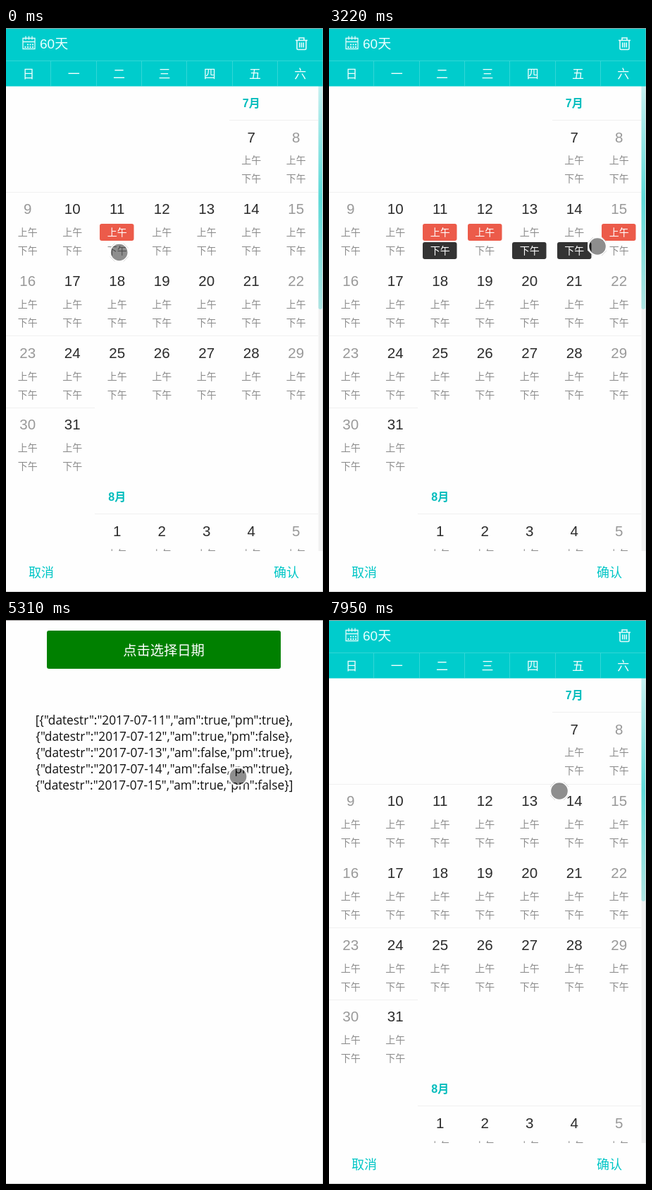
These frames come from a looping animation (450x798 px, 8 s). An HTML page with a canvas:

```html
<!DOCTYPE html>
<html lang="zh-CN">
<head>
<meta charset="utf-8">
<style>
html, body { margin: 0; width: 100%; height: 100%; overflow: hidden; background: #fefefe }
canvas { display: block }
</style>
</head>
<body>
<canvas id="stage" width="450" height="798"></canvas>
<script>
const c = document.getElementById('stage').getContext('2d');
const CJK = '"Noto Sans CJK SC", "Noto Sans CJK", sans-serif';
const ARIAL = '"Liberation Sans", ' + CJK;
const TEAL = '#00cccc', PAPER = '#fefefe', LINE = '#f0f0f0', RULE = '#33d6d6';

const LOOP = 8000, STEP = 130, BEAT = 560, TRAVEL = 300;
const CLOSE = 4367, OPEN = 5720, SLIDE = 353, CLEAR = 7800;

// One half day is picked on every beat
const picks = ['11am', '11pm', '12am', '13pm', '14pm', '15am'];
const columnX = col => 30.7 + col * 63.5;
const rowY = row => 154 + row * 101.7;
const halfY = (y, pm) => y + 33.3 + pm * 26;

// Pointer path as time, x, y: from pick to pick, then over the page and back
const path = picks.slice(1).flatMap((p, i) => {
  const x = columnX(parseInt(p) - 9) + 3, y = halfY(rowY(1), p.endsWith('pm')) + 2.5;
  return [[i && BEAT * i + TRAVEL, x, y], [BEAT * (i + 1), x, y]];
}).concat([
  [3250, 381, 309], [3510, 306, 530], [3770, 397, 762], [4310, 397, 762],
  [4550, 376, 723], [4940, 428, 520], [5550, 274, 53], [6110, 274, 53],
  [6500, 414, 55], [6780, 424, 33], [7800, 424, 25], [7930, 327, 242]
]);

function pointerAt(t) {
  const i = path.findIndex(k => k[0] > t);
  if (i < 0) return path[path.length - 1].slice(1);
  const [t0, x0, y0] = path[i - 1], [t1, x1, y1] = path[i];
  const p = (t - t0) / (t1 - t0);
  return [x0 + (x1 - x0) * p, y0 + (y1 - y0) * p];
}

const easeOut = p => 1 - (1 - Math.min(1, Math.max(0, p))) ** 3;
const panelY = t => 800 * (easeOut((t - CLOSE) / SLIDE) - easeOut((t - OPEN) / SLIDE));

function text(s, x, y, size, color, { weight = 400, font = CJK, align = 'center' } = {}) {
  c.font = `${weight} ${size}px ${font}`;
  c.fillStyle = color;
  c.textAlign = align;
  c.fillText(s, x, y + size * .37);
}

function rect(x, y, w, h, color) {
  c.fillStyle = color;
  c.fillRect(x, y, w, h);
}

function pill(x, y, w, h, color) {
  c.fillStyle = color;
  c.beginPath();
  c.roundRect(x, y, w, h, 3);
  c.fill();
}

function stroke(d, color, width) {
  c.strokeStyle = color;
  c.lineWidth = width;
  c.stroke(new Path2D(d));
}

function page(focused) {
  pill(58, 15, 332, 54, '#008000');
  if (focused) stroke('M58.5 15.5h331v53h-331z', '#c89a10', 1);
  text('点击选择日期', 224, 43, 19.3, '#fff', { weight: focused ? 300 : 400 });
  for (let i = 0; i < 5; i++) {
    const d = 11 + i, am = picks.includes(d + 'am'), pm = picks.includes(d + 'pm');
    const row = `${i ? '' : '['}{"datestr":"2017-07-${d}","am":${am},"pm":${pm}}${i < 4 ? ',' : ']'}`;
    if (focused) text(row, 224, 142 + i * 24, 16.6, '#444', { weight: 300 });
    else text(row, 224.5, 142 + i * 23, 17.3, '#111', { font: '"Open Sans", sans-serif' });
  }
}

function header() {
  rect(0, -3, 450, 85.5, TEAL);
  rect(0, 46, 450, 1, RULE);
  for (let i = 1; i < 7; i++) rect(Math.round(i * 64.3) - 1, 47, 1, 35, RULE);
  [...'日一二三四五六'].forEach((d, i) => text(d, 32 + i * 64.3, 65, 17, '#f4ffff'));
  text('60天', 48, 21.5, 19, '#e8ffff', { font: ARIAL, align: 'left' });
  stroke('M24 14.5h17v15h-17zM24 19.5h17M28 11.5v5M32.5 11.5v5M37 11.5v5', '#e0fafa', 1.3);
  for (let i = 1; i < 8; i++)
    rect(26.5 + i % 4 * 3.5, i < 4 ? 22.5 : 26, 2, 2, '#e0fafa');
  stroke('M411 17.5h17M416 17v-3h7v3M413 18v11q0 1.5 1.5 1.5h10q1.5 0 1.5-1.5v-11' +
    'M416.7 20.5v7M419.5 20.5v7M422.3 20.5v7', '#e4fbfb', 1.6);
}

function day(n, col, y, chosen) {
  const x = columnX(col);
  text(n, x, y, 20.5, col % 6 ? '#2b2b2b' : '#999', { font: ARIAL });
  ['上午', '下午'].forEach((label, pm) => {
    const cy = halfY(y, pm);
    const on = chosen.includes(n + (pm ? 'pm' : 'am'));
    if (on) pill(Math.round(x - 24.4), Math.round(cy - 12), 48.5, 24, pm ? '#333' : '#ec5b4a');
    text(label, x, cy, 14, on ? '#fff' : '#8c8c8c', { weight: on ? 400 : 300 });
  });
}

function panel(t) {
  const chosen = t < CLEAR ? picks.slice(0, Math.floor(t / BEAT) + 1) : [];
  rect(0, -3, 450, 801, PAPER);
  c.save();
  c.beginPath();
  c.rect(0, 82, 450, 658);
  c.clip();
  stroke('M317 130.5h126M0 232.5h443M0 435.5h443M0 537.5h126M126 687.5h317', LINE, 1);
  text('7月', columnX(5), 106, 16, '#00bcbc', { weight: 700, font: ARIAL });
  text('8月', columnX(2), 663, 16, '#00bcbc', { weight: 700, font: ARIAL });
  for (let n = 7; n <= 31; n++) day(n, (n - 2) % 7, rowY(Math.floor((n - 2) / 7)), chosen);
  for (let n = 1; n <= 5; n++) day(n, n + 1, 711, chosen);
  rect(443.5, 82, 6.5, 658, '#f1f1f1');
  const g = c.createLinearGradient(0, 83, 0, 398);
  ['#c4f0f0', '#5cdad8', '#aee4e2'].forEach((color, i) => g.addColorStop(i / 2, color));
  pill(443.5, 80, 5.5, 318, g);
  c.restore();
  header();
  text('取消', 32, 770, 18, '#00c6c6', { align: 'left' });
  text('确认', 380, 770, 18, '#00c6c6', { align: 'left' });
}

function drawPointer(x, y) {
  c.save();
  c.translate(x, y);
  c.fillStyle = '#fff';
  c.beginPath();
  for (let a = Math.PI / 8; a < 6.28; a += Math.PI / 4)
    c.lineTo(15 * Math.cos(a), 15 * Math.sin(a));
  c.closePath();
  c.arc(0, 0, 11.5, 0, 7);
  c.fill('evenodd');
  c.fillStyle = 'rgba(0,0,0,.44)';
  c.beginPath();
  c.arc(0, 0, 11.8, 0, 7);
  c.fill();
  stroke('M-13-6L-6-13M6-13L13-6M13 6L6 13M-6 13L-13 6', 'rgba(0,0,0,.2)', .8);
  c.restore();
}

function draw(time) {
  // The screen refreshes in steps
  const t = Math.floor((time % LOOP + 30) / STEP) * STEP;
  rect(0, 0, 450, 798, PAPER);
  page(t > OPEN);
  c.save();
  c.translate(0, Math.round(panelY(t)));
  panel(t);
  c.restore();
  drawPointer(...pointerAt(t));
  rect(0, 0, 450, 1, '#a09c9c');
  rect(0, 797, 450, 1, '#cfcfcf');
  rect(449, 1, 1, 797, 'rgba(170,180,180,.4)');
}

const start = performance.now();
(function loop() {
  draw(performance.now() - start);
  requestAnimationFrame(loop);
})();
</script>
</body>
</html>
```
